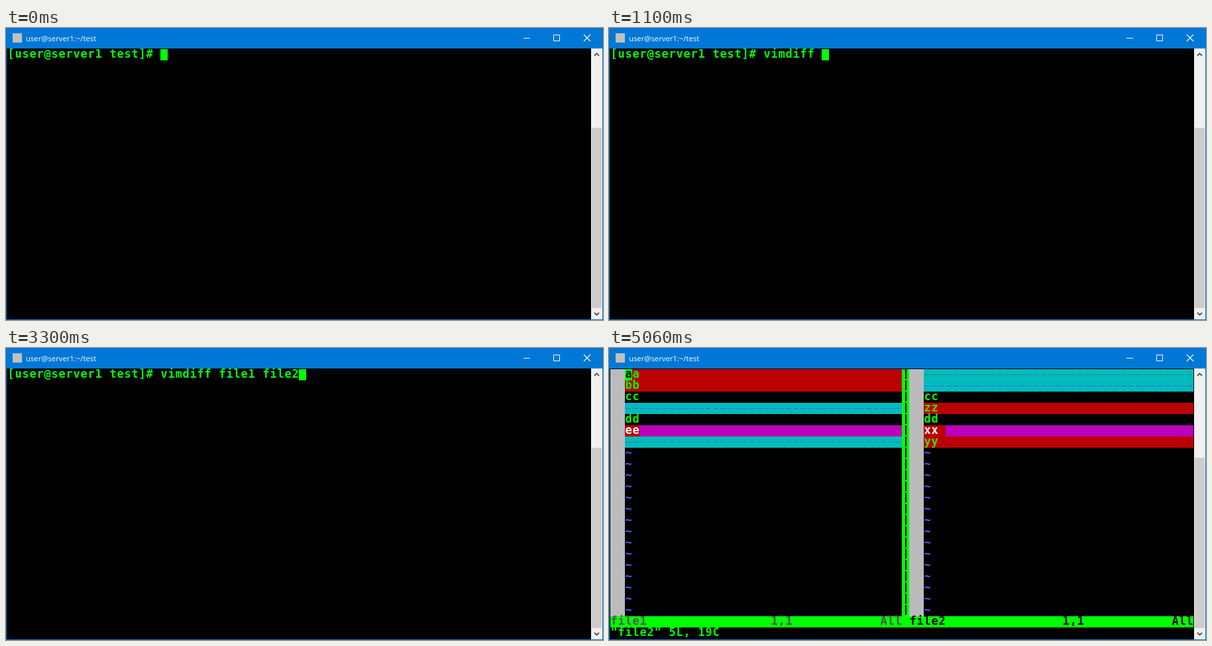
Recreate the animation shown at these times as an HTML page. Size 901 by 442 pixels, loop 5500 ms.

```html
<!DOCTYPE html>
<html lang="en">
<head>
<meta charset="utf-8">
<title>Terminal</title>
<style>
  html, body { margin: 0; width: 100%; height: 100%; overflow: hidden; background: #000; }
  svg { display: block; width: 901px; height: 442px; }
  .cell { font: bold 17px "DejaVu Sans Mono", monospace; letter-spacing: .766px; white-space: pre; }
  .title { font: 11.3px "Open Sans", "Noto Sans", sans-serif; fill: #fff; }
</style>
</head>
<body>
<svg id="stage" viewBox="0 0 901 442"></svg>
<script>
const CELL_W = 11, CELL_H = 17, LEFT = 2, TOP = 32;
const STEP = 1100, LOOP = 5500;
const GREEN = '#00ff00', RED = '#bb0000', CYAN = '#00bbbb', MAGENTA = '#bb00bb';
const GREY = '#bbbbbb', BLUE = '#5555ff', TEAL = '#3080a0', DIM_GREEN = '#40e000';
const PROMPT = '[user@server1 test]# ';
const TYPED = ['', 'vimdiff ', 'vimdiff file1', 'vimdiff file1 file2'];

const stage = document.getElementById('stage');

function add(parent, tag, attrs, text) {
  const node = document.createElementNS('http://www.w3.org/2000/svg', tag);
  for (const key in attrs) node.setAttribute(key, attrs[key]);
  if (text !== undefined) node.textContent = text;
  parent.appendChild(node);
  return node;
}

const rect = (parent, x, y, width, height, fill) =>
  add(parent, 'rect', { x, y, width, height, fill });

const stroke = (parent, d, color, width = 1, extra = {}) =>
  add(parent, 'path', { d, fill: 'none', stroke: color, 'stroke-width': width, ...extra });

const colX = col => LEFT + col * CELL_W;
const rowY = row => TOP + row * CELL_H;

const block = (parent, col, row, cols, rows, fill) =>
  rect(parent, colX(col), rowY(row), cols * CELL_W, rows * CELL_H, fill);

const write = (parent, col, row, text, fill) =>
  add(parent, 'text', { class: 'cell', x: colX(col) + .4, y: rowY(row) + 13, fill }, text);

function drawWindow() {
  rect(stage, 0, 0, 901, 442, '#0078d7');
  rect(stage, 1, 31, 882, 410, '#000');
  rect(stage, 10, 8, 14, 14, '#c0c0c0');
  add(stage, 'text', { class: 'title', x: 30, y: 20 }, 'user@server1:~/test');
  stroke(stage, 'M781 15.5h10M826.5 10.5h9v9h-9z', '#fff');
  stroke(stage, 'M872 10l10 10M882 10l-10 10', '#fff', 1.1);
  rect(stage, 883, 31, 17, 410, '#f0f0f0');
  stroke(stage, 'M888 42l3.5-3.5 3.5 3.5M888 431l3.5 3.5 3.5-3.5', '#505050', 1.8);
}

function filler(parent, col, row, cols, color) {
  block(parent, col, row, cols, 1, CYAN);
  stroke(parent, `M${colX(col) + 1} ${rowY(row) + 8.5}h${cols * CELL_W - 2}`, color, 1,
    { 'stroke-dasharray': '8 3' });
}

function changedLine(parent, col, row, cols, text, color) {
  block(parent, col, row, cols, 1, RED);
  write(parent, col, row, text, color);
}

function alteredText(parent, col, row, cols, text, marked) {
  block(parent, col, row, cols, 1, MAGENTA);
  block(parent, col, row, marked, 1, RED);
  write(parent, col, row, text, '#fff');
}

function drawDiff(parent) {
  const a = 2, b = 43, aCols = 38, bCols = 37;
  block(parent, 0, 0, 2, 22, GREY);
  block(parent, 41, 0, 2, 22, GREY);
  block(parent, 40, 0, 1, 22, GREEN);
  for (let row = 0; row < 22; row++) rect(parent, colX(40) + 5, rowY(row), 2, 15, '#000');

  changedLine(parent, a, 0, aCols, 'aa', GREEN);
  block(parent, a, 0, 1, 1, GREEN);
  write(parent, a, 0, 'a', '#000');
  changedLine(parent, a, 1, aCols, 'bb', GREEN);
  filler(parent, a, 3, aCols, BLUE);
  alteredText(parent, a, 5, aCols, 'ee', 2);
  filler(parent, a, 6, aCols, TEAL);

  filler(parent, b, 0, bCols, TEAL);
  filler(parent, b, 1, bCols, BLUE);
  changedLine(parent, b, 3, bCols, 'zz', DIM_GREEN);
  alteredText(parent, b, 5, bCols, 'xx', 3);
  changedLine(parent, b, 6, bCols, 'yy', DIM_GREEN);

  for (const col of [a, b]) {
    write(parent, col, 2, 'cc', GREEN);
    write(parent, col, 4, 'dd', GREEN);
    for (let row = 7; row < 22; row++) write(parent, col, row, '~', BLUE);
  }

  block(parent, 0, 22, 80, 1, GREEN);
  const status = (start, name, position, all, color) => {
    write(parent, start, 22, name, color);
    write(parent, position, 22, '1,1', color);
    write(parent, all, 22, 'All', color);
  };
  status(0, 'file1', 22, 37, '#555');
  status(41, 'file2', 62, 77, '#000');
  write(parent, 0, 23, '"file2" 5L, 19C', GREEN);
}

drawWindow();
const thumb = rect(stage, 884, 151, 15, 273, '#cdcdcd');
const shell = add(stage, 'g', {});
const command = write(shell, 0, 0, PROMPT, GREEN);
const cursor = block(shell, 0, 0, 1, 1, GREEN);
const diff = add(stage, 'g', {});
drawDiff(diff);

function render(time) {
  const step = Math.floor((time % LOOP) / STEP);
  const editing = step >= TYPED.length;
  shell.setAttribute('display', editing ? 'none' : 'inline');
  diff.setAttribute('display', editing ? 'inline' : 'none');
  const thumbTop = editing ? 166 : 151;
  thumb.setAttribute('y', thumbTop);
  thumb.setAttribute('height', 424 - thumbTop);
  if (!editing) {
    const line = PROMPT + TYPED[step];
    command.textContent = line;
    cursor.setAttribute('x', colX(line.length));
  }
}

const start = performance.now();
function tick() {
  render(performance.now() - start);
  requestAnimationFrame(tick);
}
tick();
</script>
</body>
</html>
```
